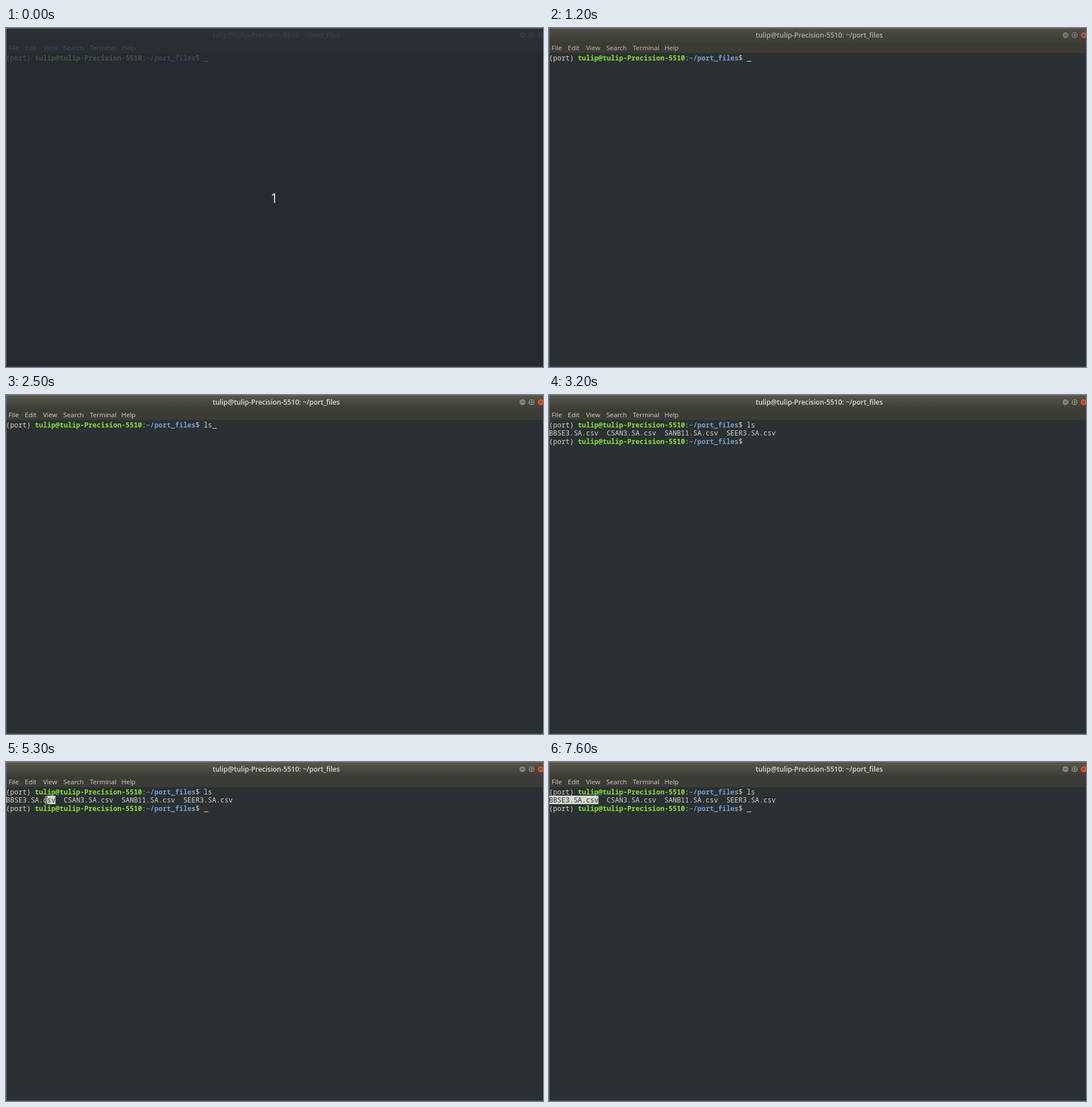
These frames come from a looping animation (942x595 px, 8 s). An HTML page with a canvas:

```html
<!DOCTYPE html>
<html lang="en">
<head>
<meta charset="utf-8">
<title>Terminal</title>
<style>
html, body { margin: 0; width: 100%; height: 100%; overflow: hidden; background: #2b3032; }
canvas { display: block; width: 942px; height: 595px; }
</style>
</head>
<body>
<canvas id="stage" width="942" height="595"></canvas>
<script>
const W = 942, H = 595, LOOP = 8000;
const CELL = 7.23, ROW = 14.5, BASE = 56.5;
const BG = '#2b3032', FG = '#d3d7cf', GREEN = '#8ae234', BLUE = '#729fcf';
const MONO = '"Noto Sans Mono", "DejaVu Sans Mono", monospace';
const SANS = '"Open Sans", "Noto Sans", sans-serif';
const USER = 'tulip@tulip-Precision-5510', DIR = '~/port_files';
const FILES = 'BBSE3.SA.csv  CSAN3.SA.csv  SANB11.SA.csv  SEER3.SA.csv';
const PROMPT_LEN = 48, NAME_LEN = 12;
const MENU = [['File', 4.5], ['Edit', 33], ['View', 65], ['Search', 100.5], ['Terminal', 147], ['Help', 202.5]];

// Times at which the text cursor toggles, starting visible.
const BLINKS = [1800, 2200, 3200, 3900, 4600, 5100, 5700, 6300, 6900, 7500];
// Mouse path: time, x, y.
const PATH = [
  [4100, 35, 95], [4200, 69, 81], [4300, 82, 73], [4400, 87, 68], [4500, 87, 68],
  [4600, 89, 67], [5200, 89, 67], [5300, 70, 67], [5400, 44, 67], [5500, 18, 67],
  [5600, 18, 67], [5700, 11, 67], [5900, 6, 67], [7600, 6, 67]
];

const ctx = document.getElementById('stage').getContext('2d');

const mix = (a, b, k) => a + (b - a) * k;
const blend = (a, b, k) => `rgb(${a.map((v, i) => Math.round(mix(v, b[i], k))).join(',')})`;

function box(x, y, w, h, color) {
  ctx.fillStyle = color;
  ctx.fillRect(x, y, w, h);
}

function label(str, x, y, font, color, align = 'left') {
  ctx.font = font;
  ctx.fillStyle = color;
  ctx.textAlign = align;
  ctx.fillText(str, x, y);
}

// Writes on the terminal's character grid and returns the next column.
function type(str, col, row, color = FG, weight = 400) {
  const font = `${weight} 12.05px ${MONO}`;
  [...str].forEach((c, i) => label(c, (col + i) * CELL, BASE + row * ROW, font, color));
  return col + str.length;
}

function prompt(row) {
  let col = type('(port) ', 0, row);
  col = type(USER, col, row, GREEN, 700);
  col = type(':', col, row);
  col = type(DIR, col, row, BLUE, 700);
  type('$', col, row);
}

function button(x, kind, focus) {
  const hot = kind === 'close' ? [226, 84, 46] : [132, 130, 120];
  ctx.beginPath();
  ctx.arc(x, 12.5, 6, 0, Math.PI * 2);
  ctx.fillStyle = blend([103, 102, 95], hot, focus);
  ctx.fill();
  ctx.strokeStyle = '#35342f';
  ctx.lineWidth = 1;
  ctx.stroke();
  ctx.beginPath();
  if (kind === 'min') {
    ctx.moveTo(x - 3, 12.5);
    ctx.lineTo(x + 3, 12.5);
  } else if (kind === 'max') {
    ctx.rect(x - 2.5, 10, 5, 5);
  } else {
    ctx.moveTo(x - 2.5, 10);
    ctx.lineTo(x + 2.5, 15);
    ctx.moveTo(x + 2.5, 10);
    ctx.lineTo(x - 2.5, 15);
  }
  ctx.strokeStyle = '#3c3b37';
  ctx.stroke();
}

function header(t) {
  const focus = t < 1200 ? 0 : t < 1300 ? 0.5 : 1;
  const menu = t < 1200 ? 0 : t < 1300 ? 0.3 : t < 1500 ? 0.6 : 1;
  const g = ctx.createLinearGradient(0, 0, 0, 26);
  g.addColorStop(0, blend([68, 68, 61], [87, 87, 78], focus));
  g.addColorStop(1, '#3c3c35');
  box(0, 0, W, 44, '#3c3b35');
  box(0, 0, W, 26, g);
  label(USER + ': ' + DIR, 474, 16.5, `600 12px ${SANS}`,
    blend([128, 125, 118], [223, 219, 210], focus), 'center');
  button(906, 'min', focus);
  button(922, 'max', focus);
  button(938, 'close', focus);
  const color = blend([184, 181, 173], [214, 210, 201], menu);
  for (const [name, x] of MENU) label(name, x, 39, `400 11.5px ${SANS}`, color);
}

function edges() {
  box(0, 0, W, 1, '#686a62');
  box(0, 0, 1, H, '#6a6f6d');
  box(0, H - 1, W, 1, '#4a4f50');
  box(0, 0, 1, 1, '#c8c8c4');
}

function mouseAt(t) {
  const i = PATH.findIndex(p => p[0] > t);
  if (i < 1) return null;
  const [a, b] = [PATH[i - 1], PATH[i]];
  const k = (t - a[0]) / (b[0] - a[0]);
  return { x: Math.round(mix(a[1], b[1], k)), y: Math.round(mix(a[2], b[2], k)) };
}

function ibeam({ x, y }) {
  ctx.beginPath();
  ctx.moveTo(x - 2, y - 5.5);
  ctx.lineTo(x + 3, y - 5.5);
  ctx.moveTo(x + 0.5, y - 5.5);
  ctx.lineTo(x + 0.5, y + 5.5);
  ctx.moveTo(x - 2, y + 5.5);
  ctx.lineTo(x + 3, y + 5.5);
  ctx.strokeStyle = '#e8e8e8';
  ctx.lineWidth = 2.6;
  ctx.stroke();
  ctx.strokeStyle = '#111';
  ctx.lineWidth = 1;
  ctx.stroke();
}

function selection(mouse, t) {
  const from = t >= 5800 ? 0 : Math.round(mouse.x / CELL);
  if (from >= NAME_LEN) return;
  const x = from * CELL;
  box(x, 59, NAME_LEN * CELL - x, 15, FG);
  type(FILES.slice(from, NAME_LEN), from, 1, BG);
}

function draw(t) {
  const mouse = mouseAt(t);
  const done = t >= 2600;
  const typed = 'ls'.slice(0, t < 2400 ? 0 : t < 2500 ? 1 : 2);

  box(0, 0, W, H, BG);
  header(t);
  prompt(0);
  type(typed, PROMPT_LEN, 0);
  if (done) {
    type(FILES, 0, 1);
    prompt(2);
    if (t >= 5300) selection(mouse, t);
  }
  if (BLINKS.filter(b => b <= t).length % 2 === 0) {
    const col = PROMPT_LEN + (done ? 0 : typed.length);
    box(Math.round(col * CELL), done ? 87 : 58, 8, 1, FG);
  }
  if (mouse) ibeam(mouse);

  if (t < 100) {
    box(0, 0, W, H, 'rgba(37,41,50,0.75)');
    label('1', 470.5, 306.5, `400 23px ${SANS}`, '#e6e8e8', 'center');
  }
  edges();
}

const start = performance.now();
function tick() {
  const t = (performance.now() - start) % LOOP;
  draw(Math.floor(t / 100) * 100);
  requestAnimationFrame(tick);
}
tick();
</script>
</body>
</html>
```
